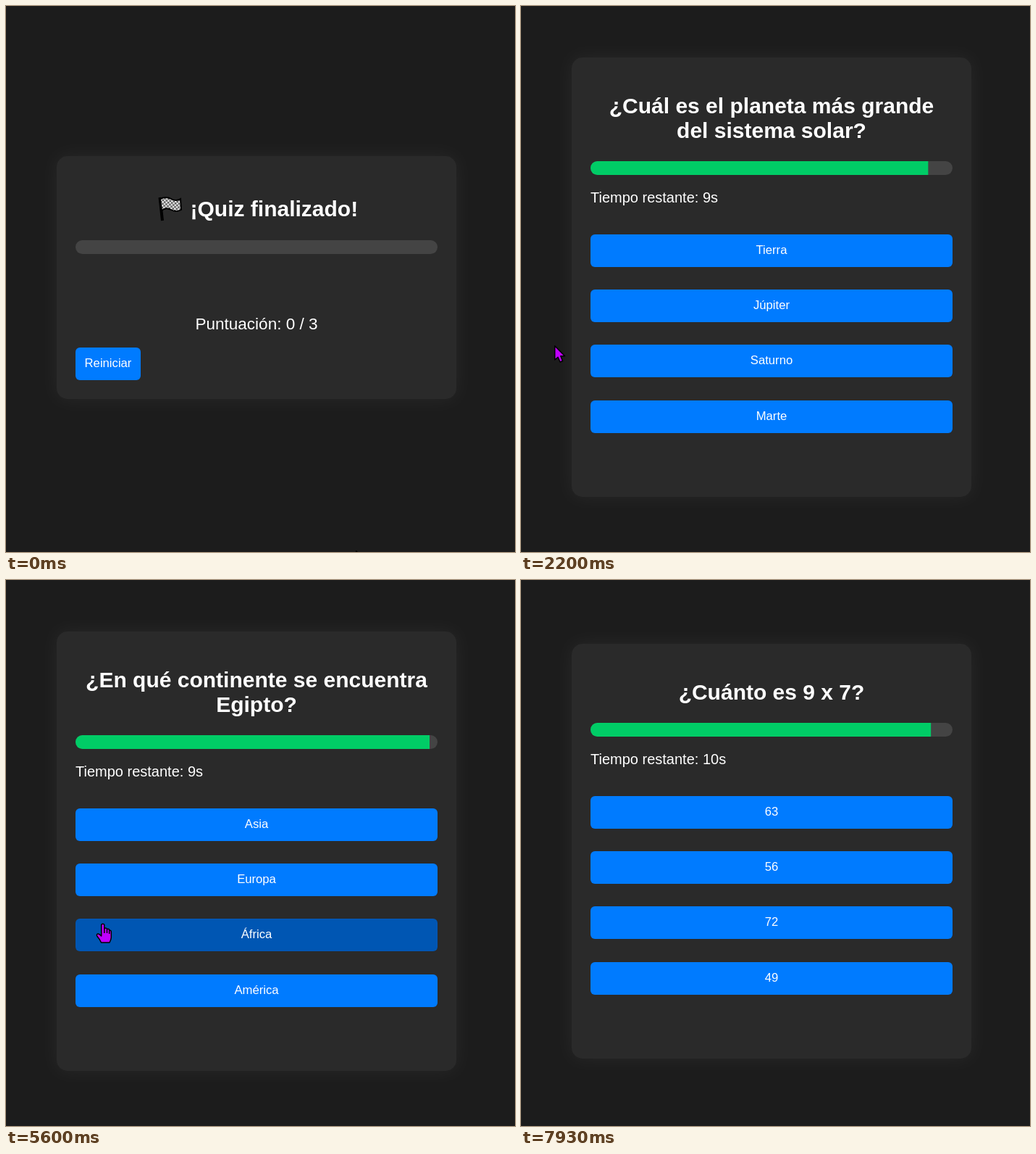
Write an HTML page that moves like this. It is 703 px wide and 753 px high and loops after 8 s.

```html
<!DOCTYPE html>
<html lang="es">
<head>
<meta charset="utf-8">
<title>Quiz</title>
<style>
  html, body { margin: 0; width: 100%; height: 100%; overflow: hidden; background: #1c1c1c; }
  svg { display: block; width: 703px; height: 753px; }
  text { font-family: "Liberation Sans", Arial, sans-serif; font-size: 16.667px; fill: #fff; }
  .mid { text-anchor: middle; }
  .title { font-size: 30px; font-weight: bold; }
  .body { font-size: 20px; }
  .score { font-size: 22.5px; }
  .bold { font-weight: bold; }
  .cursor { fill: #c000ff; stroke: #000; stroke-width: 1.5; stroke-linejoin: round; }
</style>
</head>
<body>
<svg viewBox="0 0 703 753">
  <defs>
    <filter id="glow" x="-20%" y="-20%" width="140%" height="140%"><feGaussianBlur stdDeviation="12.5"/></filter>
    <clipPath id="track"><rect x="96" width="500" height="19" rx="9.5"/></clipPath>
    <pattern id="checks" width="5" height="5" patternUnits="userSpaceOnUse" patternTransform="rotate(6)">
      <rect width="5" height="5" fill="#f2f2f2"/>
      <path d="M0 0h2.5v5h2.5v-2.5h-5z" fill="#555"/>
    </pattern>
  </defs>
  <rect width="703" height="753" fill="#1c1c1c"/>
  <rect class="card" x="70" width="552" rx="15" fill="#fff" opacity=".05" filter="url(#glow)"/>
  <rect class="card" x="70" width="552" rx="15" fill="#2a2a2a"/>
  <g id="bar" clip-path="url(#track)">
    <rect x="96" width="500" height="19" fill="#444"/>
    <rect id="fill" x="96" height="19"/>
  </g>
  <g id="screens"></g>
  <text id="clock" class="body" x="96"></text>
  <g id="correct">
    <rect x="284.7" y="605.7" width="21" height="21" fill="#16c60c" stroke="#000" stroke-width="1.5"/>
    <path d="M289 616.5l4 4 8.5-9" fill="none" stroke="#fff" stroke-width="2"/>
    <text class="body bold" x="314.5" y="623">¡Correcto!</text>
  </g>
  <g id="arrow" class="cursor">
    <path d="M.7 .7V20L5 16.2L8 23L11.5 21.5L8.8 14.8H14.5Z"/>
  </g>
  <g id="hand" class="cursor">
    <path d="M-2.3 2Q-2.3 .2 -.3 .2Q1.8 .2 1.8 2V6.5Q5 5.3 5.5 7.5Q8.5 6.8 8.7 9Q11.3 8.8 11.3 11.5V19Q11.3 22 9 26H-2.5Q-4 22 -8 17.5Q-9.5 14.8 -7.3 14Q-5.5 13.5 -2.3 17Z"/>
    <path d="M1.8 6V13M5.5 7.5V13M8.7 9V14" fill="none"/>
  </g>
</svg>
<script>
const LOOP = 8000, FPS = 15;
const byId = id => document.getElementById(id);
const show = (el, on) => el.setAttribute("display", on ? "inline" : "none");
const label = (x, y, cls, str) => `<text class="${cls}" x="${x}" y="${y}">${str}</text>`;

// The card is centred, so a shorter title lowers its top and raises what follows the title.
const buttonTops = [315, 391, 467, 544];
const quiz = (start, inset, title, answers) => ({
  start, card: [71 + inset, 606 - 2 * inset], bar: 214 - inset, clock: 271 - inset,
  title: title.map((line, i) => label(346, 148 + inset + 34 * i, "title mid", line)).join(""),
  buttons: answers.map((text, i) => ({ text, x: 96, y: buttonTops[i] - inset, w: 500 }))
});

const flag = `<path d="M212.5 264L216 296" stroke="#000" stroke-width="4"/>
  <path d="M213 266Q221 262 228 266T241 266L242 281Q235 285 228 281T215 282Z"
    fill="url(#checks)" stroke="#000" stroke-width="2"/>`;

const screens = [
  { start: 0, card: [207, 335], bar: 323,
    title: flag + label(254.5, 290, "title", "¡Quiz finalizado!") +
      label(346, 446, "score mid", "Puntuación: 0 / 3"),
    buttons: [{ text: "Reiniciar", x: 96, y: 471, w: 90 }] },
  quiz(460, 0, ["¿Cuál es el planeta más grande", "del sistema solar?"],
    ["Tierra", "Júpiter", "Saturno", "Marte"]),
  quiz(4350, 0, ["¿En qué continente se encuentra", "Egipto?"],
    ["Asia", "Europa", "África", "América"]),
  quiz(7530, 17, ["¿Cuánto es 9 x 7?"], ["63", "56", "72", "49"])
];

for (const s of screens) {
  s.el = document.createElementNS("http://www.w3.org/2000/svg", "g");
  s.el.innerHTML = s.title + s.buttons.map(b =>
    `<rect x="${b.x}" y="${b.y}" width="${b.w}" height="45" rx="6"/>` +
    label(b.x + b.w / 2, b.y + 27, "mid", b.text)).join("");
  s.rects = s.el.querySelectorAll("rect");
  byId("screens").append(s.el);
}

// Time in ms, then the values reached at that time.
const progress = [[0, 0], [510, 0], [1510, 100], [1520, 100], [2530, 90], [3530, 80], [4350, 80],
  [5350, 100], [5380, 100], [6380, 90], [7530, 90], [8530, 100]];
const pointer = [[0, 483, 751], [330, 132, 482], [950, 132, 482], [1260, 111, 464], [1330, 111, 464],
  [1800, 48, 470], [2200, 46, 468], [2750, 261, 411], [3135, 261, 411], [3530, 2, 432],
  [5220, 2, 432], [5600, 134, 474], [6080, 134, 474], [6400, 37, 500], [8000, 37, 500]];
const seconds = [[0, 10], [1520, 9], [2530, 8], [4350, 10], [5380, 9], [7530, 10]];
const praise = [[2850, 4350], [6030, 7530]];
const pointerGone = 6450;

const smooth = p => p * p * (3 - 2 * p);
function sample(track, t, ease = p => p) {
  const i = Math.max(1, track.findIndex(k => k[0] >= t));
  const a = track[i - 1], b = track[i];
  const p = ease((t - a[0]) / (b[0] - a[0]));
  return a.slice(1).map((v, j) => v + (b[j + 1] - v) * p);
}

function draw(t) {
  const screen = screens.findLast(s => s.start <= t);
  for (const s of screens) show(s.el, s === screen);
  for (const c of document.querySelectorAll(".card")) {
    c.setAttribute("y", screen.card[0]);
    c.setAttribute("height", screen.card[1]);
  }

  byId("bar").setAttribute("transform", `translate(0 ${screen.bar})`);
  byId("fill").setAttribute("width", sample(progress, t)[0] * 5);
  byId("fill").setAttribute("fill", t < 1520 ? "#ff3333" : "#00cc66");

  show(byId("clock"), screen.clock);
  byId("clock").setAttribute("y", screen.clock || 0);
  byId("clock").textContent = `Tiempo restante: ${seconds.findLast(k => k[0] <= t)[1]}s`;
  show(byId("correct"), praise.some(([from, to]) => t >= from && t < to));

  const [x, y] = sample(pointer, t, smooth);
  const visible = t < pointerGone;
  const hovered = screen.buttons.findIndex(b =>
    visible && x >= b.x && x < b.x + b.w && y >= b.y && y < b.y + 45);
  screen.rects.forEach((r, i) => r.setAttribute("fill", i === hovered ? "#0056b3" : "#007bff"));
  show(byId("arrow"), visible && hovered < 0);
  show(byId("hand"), visible && hovered >= 0);
  for (const id of ["arrow", "hand"])
    byId(id).setAttribute("transform", `translate(${Math.round(x)} ${Math.round(y)})`);
}

// Motion advances in whole steps of the frame rate.
const origin = performance.now();
function tick() {
  const t = (performance.now() - origin) % LOOP;
  const step = Math.floor((t + 5) * FPS / 1000) % (LOOP * FPS / 1000);
  draw(step * 1000 / FPS);
  requestAnimationFrame(tick);
}
tick();
</script>
</body>
</html>
```
